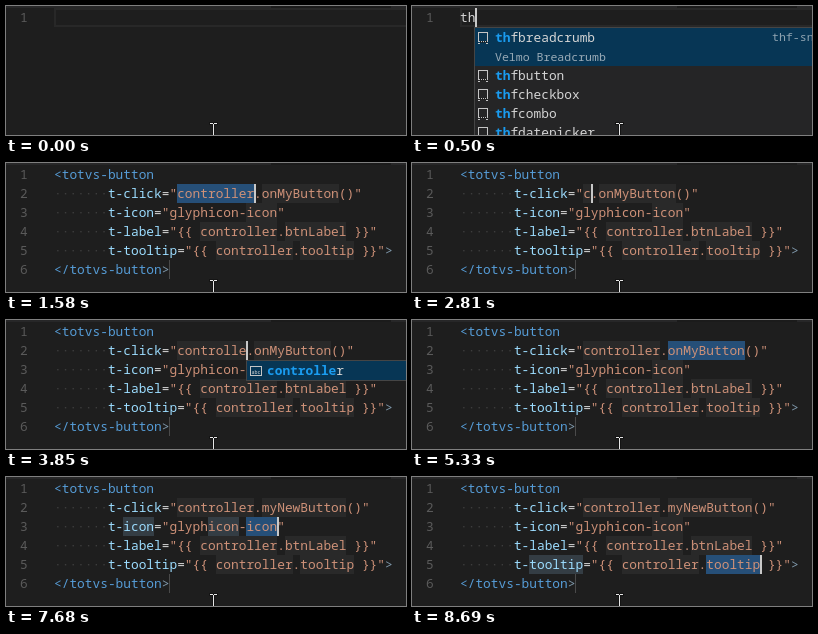
An HTML page with a canvas that plays this animation: 400x129 px, repeating every 9.16 s.

```html
<!DOCTYPE html>
<html lang="en">
<head>
<meta charset="utf-8">
<title>Editor snippet demo</title>
<style>
html, body { margin: 0; width: 100%; height: 100%; overflow: hidden; background: #1e1e1e; }
canvas { display: block; width: 400px; height: 129px; }
</style>
</head>
<body>
<canvas id="stage"></canvas>
<script>
const W = 400, H = 129, LOOP = 9160;
const X0 = 48, CW = 7.697, LH = 19, TOP = 2;
const MONO = '"Noto Sans Mono", "DejaVu Sans Mono", monospace';
const CODE = '12.83px ' + MONO, SMALL = '11.55px ' + MONO;
const COLOR = {
  bg: '#1e1e1e', num: '#5a5a5a', plain: '#d4d4d4', tag: '#569cd6',
  attr: '#9cdcfe', str: '#ce9178', dot: '#3d3d3d', slot: '#292929',
  sel: '#264f78', match: '#343d44', blue: '#1a9cf0'
};

const canvas = document.getElementById('stage');
const ctx = canvas.getContext('2d');
const dpr = window.devicePixelRatio || 1;
canvas.width = W * dpr;
canvas.height = H * dpr;

// Key press times
const KEYS = {
  prefix: [320, 480, 630, 780, 880, 1030],
  scope: [2810, 3040, 3140, 3240, 3370, 3490, 3600, 3750, 3850, 4000],
  method: [5410, 5740, 6120, 6240, 6350, 6650, 6780, 6930, 7030, 7160, 7260]
};
// Selected placeholders: start, end, row, column, length
const PICKS = [
  [1580, 2810, 1, 16, 10],
  [4780, 5410, 1, 27, 10],
  [7680, 7830, 2, 25, 4],
  [7830, 8060, 3, 19, 10],
  [8060, 8460, 3, 30, 8],
  [8460, 8690, 4, 21, 10],
  [8690, LOOP, 4, 32, 7]
];
const HIDDEN = [[0, 320], [2180, 2660], [5330, 5410]];

const within = (t, a, b) => t >= a && t < b;
const colX = c => X0 + c * CW;
const rowY = r => TOP + r * LH;
const typed = (word, times, t) => word.slice(0, times.filter(k => k <= t).length);

function box(x, y, w, h, color) {
  ctx.fillStyle = color;
  ctx.fillRect(x, y, w, h);
}

function text(s, x, y, color, font = CODE) {
  ctx.font = font;
  ctx.fillStyle = color;
  ctx.fillText(s, x, y);
}

function cells(row, col, n, color) {
  const x = Math.round(colX(col));
  box(x, rowY(row), Math.round(colX(col + n)) - x, LH, color);
}

function caret(row, col) {
  box(Math.round(colX(col)), rowY(row), 2, LH, '#c8c8c8');
}

function lineNumber(row) {
  text(String(row + 1), 14, rowY(row) + 14, COLOR.num);
}

function codeLine(line, row) {
  const y = rowY(row) + 14;
  const m = line.match(/^( +)([\w-]+)(=)("[^"]*")(>?)$/);
  if (!m) {
    const p = line.match(/^(<\/?)([\w-]+)(>?)$/);
    text(p[1], X0, y, COLOR.tag);
    text(p[2], colX(p[1].length), y, COLOR.tag);
    text(p[3], colX(p[1].length + p[2].length), y, '#7f98ab');
    return;
  }
  for (let i = 0; i < m[1].length; i++) box(colX(i + 0.5) - 0.7, y - 5, 1.4, 1.4, COLOR.dot);
  let col = m[1].length;
  [COLOR.attr, COLOR.plain, COLOR.str, '#7f98ab'].forEach((color, i) => {
    text(m[i + 2], colX(col), y, color);
    col += m[i + 2].length;
  });
}

function snippetIcon(x, y) {
  ctx.strokeStyle = '#c5c5c5';
  ctx.lineWidth = 1;
  ctx.strokeRect(x + 0.5, y + 0.5, 9, 9);
  for (let i = 2; i < 9; i += 2) box(x + i, y + 9, 1, 2, COLOR.bg);
  box(x, y + 11, 2, 1, '#c5c5c5');
  box(x + 8, y + 11, 2, 1, '#c5c5c5');
}

function wordIcon(x, y) {
  ctx.strokeStyle = '#c5c5c5';
  ctx.lineWidth = 1;
  ctx.strokeRect(x + 0.5, y + 0.5, 11, 9);
  text('abc', x + 1.6, y + 7.5, '#d4d4d4', '5px ' + MONO);
}

function popup(left, top, items, hit, doc) {
  const first = doc ? 2 * LH : LH;
  const h = first + (items.length - 1) * LH + 2;
  left = Math.round(left);
  box(left, top, W - left + 2, h, '#454545');
  box(left + 1, top + 1, W - left, h - 2, '#252526');
  box(left + 1, top + 1, W - left, first, '#073655');
  items.forEach((label, i) => {
    const y = top + 1 + (i ? first + (i - 1) * LH : 0);
    const x = left + 21;
    if (doc) snippetIcon(left + 4, y + 4);
    else wordIcon(left + 4, y + 5);
    const at = Math.max(0, label.indexOf(hit));
    const end = at + hit.length;
    text(label.slice(0, at), x, y + 14, COLOR.plain);
    text(hit, x + at * CW, y + 14, COLOR.blue, 'bold ' + CODE);
    text(label.slice(end), x + end * CW, y + 14, COLOR.plain);
  });
  if (doc) {
    text('thf-snippets', Math.max(360, left + 282), top + 14, '#8fa3b1', SMALL);
    text(doc, left + 21, top + 34, '#9aabb7', SMALL);
  }
}

function mouse() {
  box(203, 116, 9, 3, '#141414');
  box(206, 118, 3, 11, '#141414');
  box(204, 117, 3, 1, '#e8e8e8');
  box(208, 117, 3, 1, '#e8e8e8');
  box(207, 118, 1, 11, '#e8e8e8');
}

function drawPrefix(t, blink) {
  ctx.strokeStyle = '#282828';
  ctx.lineWidth = 2;
  ctx.strokeRect(49, 3, W, 17);
  lineNumber(0);
  const word = typed('thfbut', KEYS.prefix, t);
  text(word, X0, rowY(0) + 14, COLOR.plain);
  if (blink) caret(0, word.length);
  if (t < 400) return;
  const names = ['breadcrumb', 'button', 'checkbox', 'combo', 'datepicker'].map(s => 'thf' + s);
  const items = names.filter(s => s.startsWith(word));
  const doc = items[0] === 'thfbutton' ? 'Velmo Button' : 'Velmo Breadcrumb';
  popup(colX(word.length) - 1, 21, items, word, doc);
  if (blink) caret(0, word.length);
}

function drawSnippet(t, blink) {
  const scope = t < 2810 ? 'controller' : typed('controller', KEYS.scope, t);
  const method = t < 5410 ? 'onMyButton' : typed('myNewButton', KEYS.method, t);
  const pad = ' '.repeat(7);
  const lines = [
    '<totvs-button',
    `${pad}t-click="${scope}.${method}()"`,
    `${pad}t-icon="glyphicon-icon"`,
    `${pad}t-label="{{ controller.btnLabel }}"`,
    `${pad}t-tooltip="{{ controller.tooltip }}">`,
    '</totvs-button>'
  ];

  cells(1, 16, scope.length, COLOR.slot);
  cells(1, 17 + scope.length, method.length, COLOR.slot);
  PICKS.slice(2).forEach(p => cells(p[2], p[3], p[4], COLOR.slot));
  box(163, rowY(5), 1, LH, '#4a4a4a');

  const pick = PICKS.find(p => within(t, p[0], p[1]));
  let row = 1, col = 16 + scope.length;
  if (pick) {
    const [, , r, c, n] = pick;
    const word = lines[r].slice(c, c + n);
    if (t >= 1730) lines.forEach((line, i) => {
      for (let k = line.indexOf(word); k >= 0; k = line.indexOf(word, k + n)) cells(i, k, n, COLOR.match);
    });
    cells(r, c, n, COLOR.sel);
    row = r;
    col = c + n;
  } else if (t >= 5410) {
    col = 27 + method.length;
  }

  lines.forEach((line, i) => {
    lineNumber(i);
    codeLine(line, i);
  });
  if (within(t, 2890, 4300)) {
    const items = scope === 'c' ? ['click', 'controller', 'glyphicon'] : ['controller'];
    popup(colX(col), 40, items, scope);
  }
  if (blink) caret(row, col);
}

function draw(t) {
  ctx.setTransform(dpr, 0, 0, dpr, 0, 0);
  box(0, 0, W, H, COLOR.bg);
  box(0, 0, W, 2, '#272728');
  box(265, 0, 120, 2, '#1b1b1b');
  const blink = !HIDDEN.some(([a, b]) => within(t, a, b));
  if (t < 1580) drawPrefix(t, blink);
  else drawSnippet(t, blink);
  mouse();
}

const start = performance.now();
function tick() {
  draw((performance.now() - start) % LOOP);
  requestAnimationFrame(tick);
}
tick();
</script>
</body>
</html>
```
